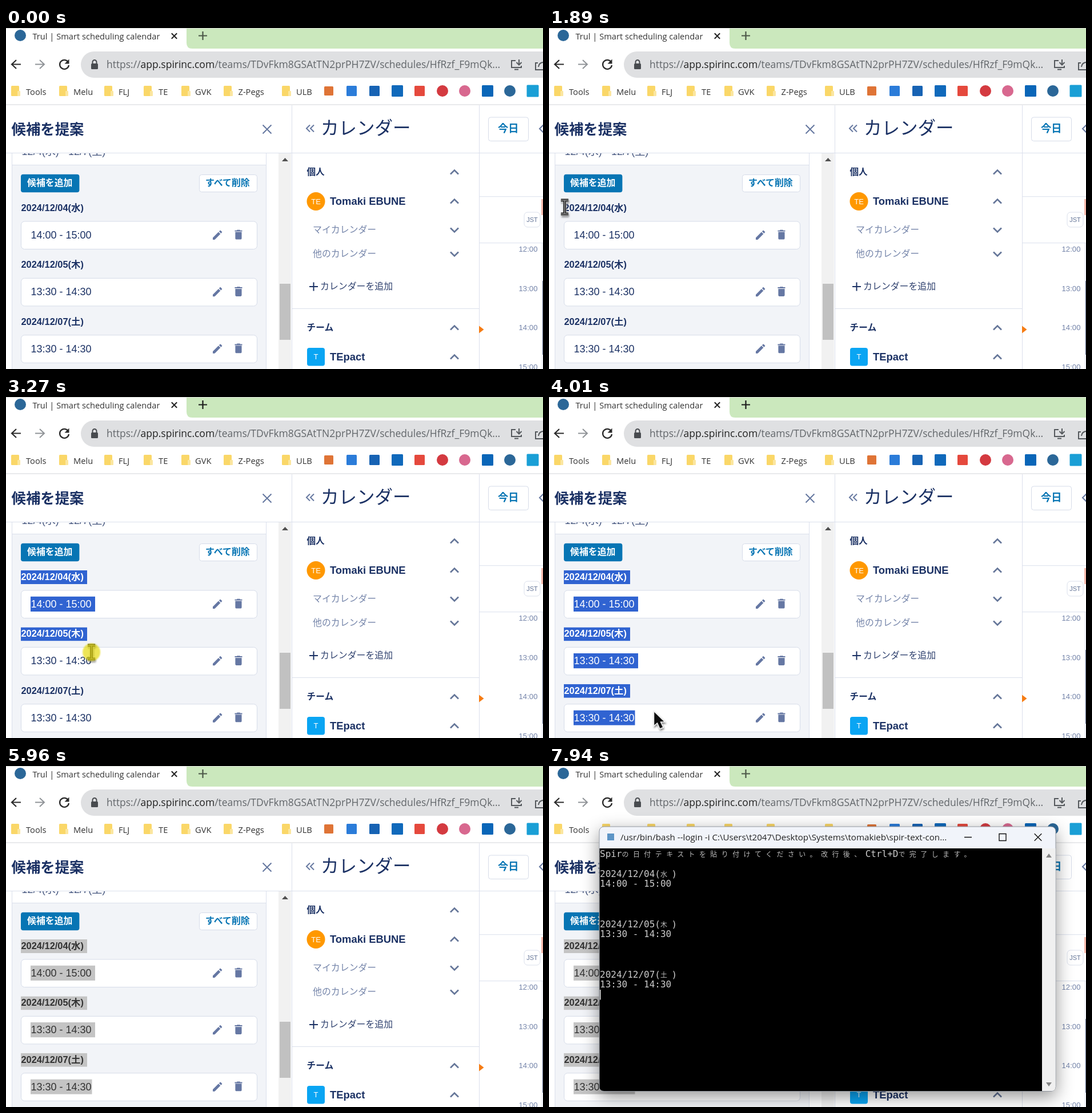
These frames come from a looping animation (940x596 px, 8 s). An HTML page:

```html
<!DOCTYPE html>
<html lang="ja">
<head>
<meta charset="utf-8">
<title>Scheduling demo</title>
<style>
html, body { margin: 0; width: 100%; height: 100%; overflow: hidden; background: #fff; }
svg { display: block; width: 100vw; height: 100vh; }
text { white-space: pre; }
.ui { font-family: "Open Sans", "Noto Sans", sans-serif; }
.web { font-family: "Liberation Sans", "Noto Sans CJK JP", "Noto Sans CJK", sans-serif; }
.jp { font-family: "Noto Sans CJK JP", "Noto Sans CJK", sans-serif; }
.mono { font-family: "DejaVu Sans Mono", "Noto Sans CJK JP", "Noto Sans CJK", monospace; }
.b { font-weight: 700; }
.thin { font-weight: 350; }
</style>
</head>
<body>
<svg id="stage" viewBox="0 0 940 596" preserveAspectRatio="none"></svg>
<script>
const LOOP = 8000;
const NAVY = '#1b3164', BLUE = '#0775b4', SLATE = '#647598', MUTED = '#7585aa', LINE = '#dbe0ec';

const text = (x, y, size, fill, cls, s, extra = '') =>
  `<text x="${x}" y="${y}" font-size="${size}" fill="${fill}" class="${cls}" ${extra}>${s}</text>`;
const rect = (x, y, w, h, fill, r = 0, stroke = 'none') =>
  `<rect x="${x}" y="${y}" width="${w}" height="${h}" rx="${r}" fill="${fill}" stroke="${stroke}"/>`;
const circle = (x, y, r, fill) => `<circle cx="${x}" cy="${y}" r="${r}" fill="${fill}"/>`;
const line = (d, stroke, w = 1, extra = '') =>
  `<path d="${d}" fill="none" stroke="${stroke}" stroke-width="${w}" ${extra}/>`;
const shape = (d, fill, extra = '') => `<path d="${d}" fill="${fill}" ${extra}/>`;
const cross = (x, y, r, color, w) => line(`M${x - r} ${y - r}l${2 * r} ${2 * r}m0 ${-2 * r}l${-2 * r} ${2 * r}`, color, w);
const chevron = (y, dir) => line(`M778 ${y + 3.5 * dir}l7 ${-7 * dir} 7 ${7 * dir}`, SLATE, 2.6);

function browser() {
  const folders = [[9, 35, 'Tools'], [93, 118, 'Melu'], [172, 197, 'FLJ'], [241, 267, 'TE'],
    [307, 331, 'GVK'], [381, 406.5, 'Z-Pegs'], [483, 508, 'ULB']];
  const icons = [[565, 8, '#df7436'], [605, 9, '#2b7cd9'], [645, 9, '#1763b4'], [685, 10, '#1069bb'],
    [724, 9, '#e5493d'], [764, 10, '#d43a40', 1], [803, 10, '#d8688f', 1], [843, 10, '#0a66b8'],
    [882, 10, '#2b6798', 1], [922, 10.5, '#1a9fd6']];
  return rect(0, 0, 940, 134, '#fff') +
    shape('M316 0H940V36H326Q316 36 316 26Z', '#cbe8bd') +
    line('M0 .5H940', '#d5d9d3') +
    circle(25, 13, 10, '#2b6798') +
    text(46.5, 20, 14.65, '#333', 'ui', 'Trul | Smart scheduling calendar') +
    cross(294.5, 14, 4.7, '#222', 2) +
    `<path id="newTab" d="M337 13.5h15m-7.5-7.5v15" fill="none" stroke-width="2.2"/>` +
    line('M26 63.5H10m8-7.5l-8 7.5 8 7.5', '#2b2b2b', 2.2) +
    line('M51 63.5h16m-8-7.5l8 7.5-8 7.5', '#909498', 2) +
    line('M108.5 59a8 8 0 1 0 1.5 6', '#2b2b2b', 2.3) + shape('M110.5 54.5v8h-8z', '#2b2b2b') +
    rect(131, 41, 840, 46, '#dfe0e2', 23) +
    rect(149, 62, 12, 10, '#484b4f', 1.5) + line('M151.5 62v-2.5a3.5 3.5 0 0 1 7 0V62', '#484b4f', 2) +
    text(176, 70, 17.48, '#62666a', 'ui', 'https://<tspan fill="#222">app.spirinc.com</tspan>/teams/TDvFkm8GSAtTN2prPH7ZV/schedules/HfRzf_F9mQk...') +
    line('M892 57h-7v12h17v-3M890 72.5h7M898 55v9m-4.5-4l4.5 4.5 4.5-4.5', '#55595d', 2) +
    line('M931 61h-4v12h16M932 68q1-8 10-8', '#55595d', 2) +
    folders.map(([x, tx, s]) => rect(x, 101, 14, 18, '#fad768', 1.5) + rect(x + 11, 110, 5, 9, '#fbe6a0', 1) +
      text(tx, 116.5, 14.7, '#333', 'ui', s)).join('') +
    icons.map(([x, r, c, round]) => round ? circle(x, 110, r, c) : rect(x - r, 110 - r, 2 * r, 2 * r, c, 1.5)).join('') +
    line('M0 134H940', '#d3d5d8');
}

// Selectable lines of the slot list
const rows = [];
[['04(水)', '14:00 - 15:00'], ['05(木)', '13:30 - 14:30'], ['07(土)', '13:30 - 14:30']].forEach(([day, time], i) => {
  const dy = 99.4 * i;
  rows.push({ s: '2024/12/' + day, x: 26, tx: 26.5, top: 303 + dy, h: 24, end: 142, base: 320 + dy, size: 16.4, cls: 'web b', ch: 8.7 });
  rows.push({ s: time, x: 43, tx: 43.5, top: 348.6 + dy, h: 26.4, end: i < 2 ? 156 : 150.5, base: 368 + dy, size: 18, cls: 'web', ch: 8.2 });
});

const selectable = (r, i) =>
  text(r.tx, r.base, r.size, NAVY, r.cls, r.s) +
  `<clipPath id="clip${i}"><rect x="${r.x}" y="${r.top}" width="0" height="${r.h}"/></clipPath>` +
  `<g clip-path="url(#clip${i})">${rect(r.x, r.top, 130, r.h, 'var(--bg)')}` +
  text(r.tx, r.base, r.size, 'var(--fg)', r.cls, r.s) + '</g>';

const card = i => {
  const y = 338 + 99.4 * i;
  return rect(26.5, y, 413, 48.5, '#fff', 6, '#d6dce9') +
    shape('M3 17.25V21h3.75L17.81 9.94l-3.75-3.75zM20.71 7.04a1 1 0 0 0 0-1.41l-2.34-2.34a1 1 0 0 0-1.41 0l-1.83 1.83 3.75 3.75z',
      '#6577a3', `transform="translate(359.3 ${y + 13}) scale(.9)"`) +
    shape('M6 19c0 1.1.9 2 2 2h8c1.1 0 2-.9 2-2V7H6zM19 4h-3.5l-1-1h-5l-1 1H5v2h14z',
      '#6577a3', `transform="translate(395.8 ${y + 12}) scale(.93)"`);
};

function slots() {
  return text(27.5, 222, 18.1, '#44557e', 'web', '12/4(水) - 12/7(土)') +
    rect(0, 135, 500, 83, '#fff') +
    rect(10.5, 239.5, 445, 400, '#f2f4f8', 0, LINE) + line('M10.5 218V240M455.5 218V240', LINE) +
    line('M0 218.5H940', LINE) +
    text(9.5, 186, 25.4, NAVY, 'jp b', '候補を提案') + cross(457, 177, 7.5, '#6678a0', 2) +
    rect(26, 255.7, 102.4, 31.6, BLUE, 4) + text(37, 276, 15.9, '#fff', 'jp b', '候補を追加') +
    rect(338.5, 256.5, 101, 30, '#fff', 4, '#d6dce9') + text(349, 276, 15.9, BLUE, 'jp b', 'すべて削除') +
    [0, 1, 2].map(card).join('') + rows.map(selectable).join('') +
    rect(477, 219, 22, 377, '#f1f1f1') + rect(479, 447, 19, 98, '#c1c1c1') + shape('M483 233h11l-5.5-6z', '#505050') +
    line('M500.5 135V596', LINE);
}

function calendar() {
  return line('M532 169.5l-6 6 6 6m7-12l-6 6 6 6', '#6678a0', 2) +
    text(551, 186, 31.5, NAVY, 'jp thin', 'カレンダー') +
    text(526.5, 257, 15.6, NAVY, 'jp b', '個人') + chevron(252, 1) +
    circle(542.5, 303, 16, '#ff9800') + text(542.5, 307.5, 13, '#fff', 'web', 'TE', 'text-anchor="middle"') +
    text(567, 309, 18.4, NAVY, 'web b', 'Tomaki EBUNE') + chevron(303, 1) +
    text(537, 358, 15.9, MUTED, 'jp thin', 'マイカレンダー') + chevron(353, -1) +
    text(537, 400, 15.9, MUTED, 'jp thin', '他のカレンダー') + chevron(395, -1) +
    line('M531 452h15m-7.5-7.5v15', NAVY, 2) + text(550, 456.5, 15.9, '#30426f', 'jp thin', 'カレンダーを追加') +
    line('M500 490.5H828M828.5 135V596', LINE) +
    text(526.5, 529, 15.7, NAVY, 'jp b', 'チーム') + chevron(524, 1) +
    rect(527, 559, 31, 31.5, '#0aa5f3', 4) + text(542.5, 579, 13, '#fff', 'web', 'T', 'text-anchor="middle"') +
    text(567, 581, 18.4, NAVY, 'web b', 'TEpact') + chevron(575, 1) +
    rect(844.5, 156, 70, 41.5, '#fff', 4, '#d6dce9') + text(861, 182, 18.2, BLUE, 'jp b', '今日') +
    line('M941 169l-7 7 7 7', '#6678a0', 2) +
    line('M828 294.7H940M828 375.7H940M938.5 376V596', LINE) + rect(937, 299, 3, 28, '#f5b9ab') +
    line('M939.5 442V571', '#77829a') +
    rect(907, 322, 28, 26, '#fff', 6, LINE) + text(921, 339, 11, SLATE, 'web', 'JST', 'text-anchor="middle"') +
    [12, 13, 14, 15].map((h, i) => text(897.5, 391 + 68.6 * i, 13.2, MUTED, 'web', h + ':00')).join('') +
    shape('M828 520.5v13l8.5-6.5z', '#f57c14');
}

// Wide glyphs take two terminal cells
const wide = s => `<tspan font-size="12" style="letter-spacing:7.4px" fill="#bbb">${s}</tspan>`;
const termLine = (row, s) => text(89, 158.5 + 17.6 * row, 16, '#ccc', 'mono', s);

function terminal() {
  const pasted = [['04', '水', '14:00 - 15:00'], ['05', '木', '13:30 - 14:30'], ['07', '土', '13:30 - 14:30']];
  return '<g id="term"><g filter="url(#shadow)">' + rect(88, 106, 799, 462.5, '#f1f4fa', 8, '#8f949c') + '</g>' +
    rect(102, 118, 12, 12, '#5d95c6') +
    text(125, 130, 15.13, '#222', 'ui', '/usr/bin/bash --login -i C:\\Users\\t2047\\Desktop\\Systems\\tomakieb\\spir-text-con...') +
    line('M727 124.5h13M788 118.5h12v12h-12z', '#111', 1.4) + cross(856, 124.5, 6.3, '#111', 1.4) +
    shape('M88.5 144H863V568H96q-7.5 0-7.5-7.5z', '#000') +
    shape('M863 144h23.5v416.5q0 7.5-7.5 7.5h-16z', '#f0f0f0') +
    shape('M870 160h10l-5-7zM870 553h10l-5 7z', '#858585') +
    termLine(0, 'Spir' + wide('の日付テキストを貼り付けてください。改行後、') + 'Ctrl+D' + wide('で完了します。')) +
    '<g id="pasted">' + pasted.map(([d, w, s], i) =>
      termLine(2 + 5 * i, `2024/12/${d}(${wide(w)})`) + termLine(3 + 5 * i, s)).join('') + '</g>' +
    '<rect id="caret" width="1.5" height="17.5" fill="#e5e5e5"/>' +
    line('M411 264.5h4.5l1.5 1 1.5-1h4.5M411 287h4.5l1.5-1 1.5 1h4.5M417 265v21.5', '#d8d8d8', 1.6, 'id="termBeam"') +
    '</g>';
}

function pointer() {
  const beam = 'M-6.5-12H6.5M-6.5 12H6.5M0-12V12';
  return '<g id="pointer"><g id="beam" filter="url(#drop)">' +
    line(beam, '#fff', 6.5, 'opacity=".6"') + line(beam, '#2c2c2c', 5) + line(beam, '#8c8c8c', 1.6) + '</g>' +
    '<g id="arrow" filter="url(#drop)">' +
    shape('M.5 1V27l6-5 4.5 10 6-2.5-4.5-9.5h7.5z', '#111', 'stroke="#eee" stroke-width="1.5"') + '</g>' +
    '<circle id="halo" r="15.5" fill="#e4d800" opacity=".66" filter="url(#soft)"/></g>';
}

const stage = document.getElementById('stage');
stage.innerHTML = `<defs>
  <filter id="shadow" x="-20%" y="-20%" width="140%" height="150%"><feDropShadow dx="0" dy="9" stdDeviation="15" flood-opacity=".42"/></filter>
  <filter id="drop" x="-60%" y="-30%" width="240%" height="180%"><feDropShadow dx="1" dy="2.5" stdDeviation="1.5" flood-opacity=".5"/></filter>
  <filter id="soft"><feGaussianBlur stdDeviation="1"/></filter></defs>` +
  rect(0, 0, 940, 596, '#fff') + slots() + calendar() + browser() + pointer() + terminal();

const $ = id => document.getElementById(id);
const show = (id, on) => { $(id).style.display = on ? '' : 'none'; };
const clips = rows.map((_, i) => document.querySelector(`#clip${i} rect`));

// start, last step, steps, x, y, ease-out power
const moves = [
  [650, 1410, 12, 46, 324, 2],
  [1480, 2020, 7, 24, 311, 1.5],
  [2160, 2160, 1, 22, 309, 1],
  [2690, 2750, 2, 93, 313, 1],
  [2816, 3480, 11, 182, 522, 1],
  [3540, 3740, 4, 183, 548, 1.5]
];

function pointerAt(t) {
  let x = 776, y = 585;
  for (const [from, to, n, ex, ey, pow] of moves) {
    if (t < from) break;
    const step = n > 1 ? Math.floor((t - from + 8) / ((to - from) / (n - 1))) + 1 : n;
    const k = 1 - (1 - Math.min(step / n, 1)) ** pow;
    x += (ex - x) * k;
    y += (ey - y) * k;
  }
  return [x, y];
}

function pickedWidth(r, x, y) {
  const full = r.end - r.x;
  if (y >= r.top + r.h) return full;
  if (y < r.top) return 0;
  const w = Math.round((x - 15 - r.x) / r.ch) * r.ch;
  return Math.max(0, Math.min(w, full));
}

function render(t) {
  const [x, y] = pointerAt(t);
  const beam = x >= 26 && x < 150;
  show('pointer', t >= 650 && t < 5230);
  $('pointer').setAttribute('transform', `translate(${x.toFixed(1)} ${y.toFixed(1)})`);
  show('beam', beam);
  show('arrow', !beam);
  show('halo', t >= 2490 && t < 4010);

  rows.forEach((r, i) => clips[i].setAttribute('width', t < 2690 ? 0 : pickedWidth(r, x, y)));
  const focused = t < 5960;
  stage.style.setProperty('--bg', focused ? '#3063d1' : '#c4c4c4');
  stage.style.setProperty('--fg', focused ? '#fff' : '#323232');
  $('newTab').setAttribute('stroke', t >= 2490 && focused ? '#1c1c1c' : '#4c5748');

  show('term', t >= 6220);
  show('pasted', t >= 6880);
  show('termBeam', t < 7870);
  show('caret', (t >= 6690 && t < 7340) || t >= 7870);
  const [cx, cy] = t < 6880 ? [89, 180] : t < 7870 ? [214.5, 373.5] : [89, 391];
  $('caret').setAttribute('x', cx);
  $('caret').setAttribute('y', cy);
}

const start = performance.now();
function tick() {
  render((performance.now() - start) % LOOP);
  requestAnimationFrame(tick);
}
tick();
</script>
</body>
</html>
```
